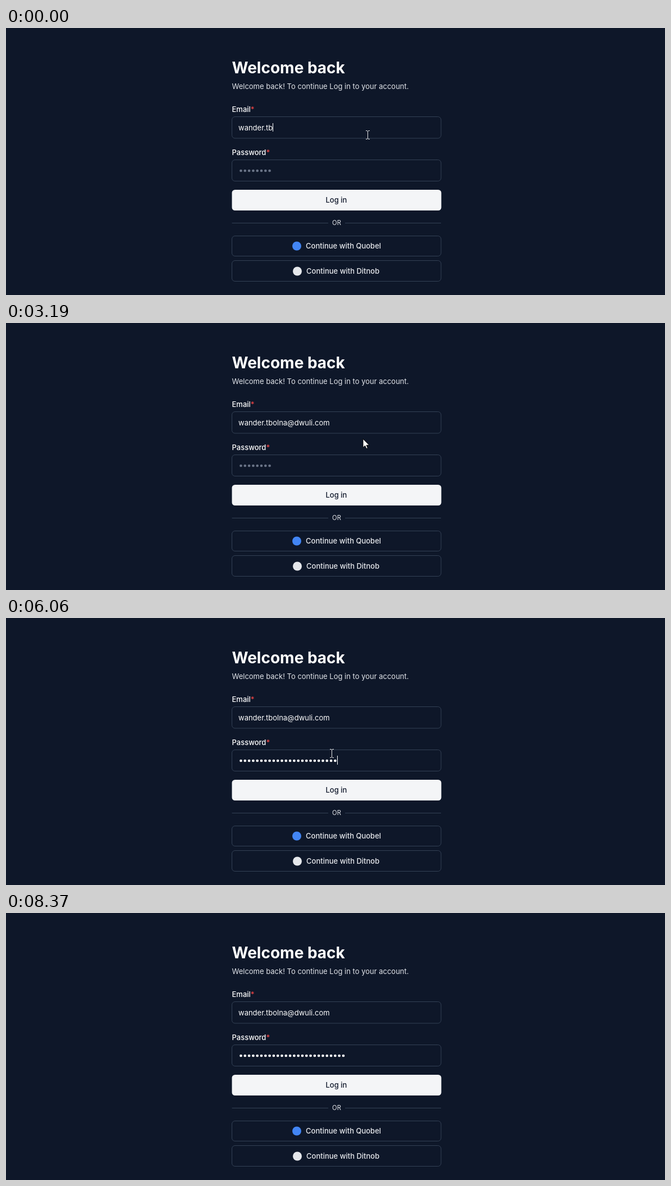
Animation, 1174 px wide and 477 px high, one loop 8740 ms. Source, as an HTML page:

```html
<!DOCTYPE html>
<html lang="en">
<head>
<meta charset="utf-8">
<title>Log in</title>
<style>
  html, body { margin: 0; width: 100%; height: 100%; overflow: hidden; background: #0e1729; }
  svg { display: block; }
  text { font: 400 13px Inter, sans-serif; fill: #fff; }
  .title { font-size: 28px; font-weight: 700; }
  .soft { fill: #e2e5ea; }
  .label { font-weight: 500; }
  .star { fill: #ef4444; }
  .social text { font-weight: 500; fill: #e9ebef; }
  .or { font-size: 11.2px; text-anchor: middle; }
  .box { fill: none; stroke: #334155; }
  .dots { stroke-width: 4.7; stroke-linecap: round; stroke-dasharray: 0 7.3; }
  .loading .dim { opacity: .5; }
  .loading #login { opacity: .45; }
  #login text { fill: #0f172a; font-weight: 500; }
  #spinner { fill: none; stroke: #0f172a; stroke-width: 2; stroke-linecap: round; }
  .pointer { fill: #fff; stroke: #000; stroke-linejoin: round; }
</style>
</head>
<body>
<svg id="stage" width="1174" height="477" viewBox="0 0 1174 477">
  <text class="title" x="402.5" y="81">Welcome back</text>
  <text class="soft" x="402.5" y="109">Welcome back! To continue Log in to your account.</text>

  <text class="label" x="402.5" y="150">Email<tspan class="star">*</tspan></text>
  <g class="dim">
    <rect class="box" x="402.5" y="158.5" width="372.5" height="38.5" rx="5.5"/>
    <text id="email" x="414" y="183"></text>
  </g>

  <text class="label" x="402.5" y="227">Password<tspan class="star">*</tspan></text>
  <g class="dim">
    <rect class="box" x="402.5" y="235.5" width="372.5" height="38" rx="5.5"/>
    <path id="dots" class="dots"/>
  </g>
  <rect id="caret" width="1" fill="#fff"/>

  <g id="login">
    <rect id="face" x="402.5" y="289" width="373" height="37" rx="5.5"/>
    <path id="spinner" d="M6.6 0A6.6 6.6 0 1 1 2.05 -6.28"/>
    <text id="action" y="312">Log in</text>
  </g>

  <path class="box" d="M402.5 348.5H574M604 348.5H775"/>
  <text class="or soft" x="589" y="352">OR</text>

  <g class="social dim">
    <rect class="box" x="402.5" y="371.5" width="372.5" height="36" rx="5.5"/>
    <circle cx="518" cy="389.5" r="8" fill="#4285f4"/>
    <text x="534" y="394">Continue with Quobel</text>
    <rect class="box" x="402.5" y="415.5" width="372.5" height="37" rx="5.5"/>
    <circle cx="519" cy="434.5" r="8" fill="#e5e7eb"/>
    <text x="535" y="439">Continue with Ditnob</text>
  </g>

  <g id="cursor">
    <path id="beam" fill="none" stroke="#e6e6e6" d="M-3 -7.5H-1L.5 -6.5 2 -7.5H4M.5 -6.5V6.5M-3 7.5H-1L.5 6.5 2 7.5H4"/>
    <path id="arrow" class="pointer" d="M0 0V15.5L3.6 12.2 6 17.5 8.4 16.4 6.1 11.3H11Z"/>
    <path id="hand" class="pointer" d="M-1.5 1Q0 -1 1.5 1V7Q3 5.5 4.5 7.2 6 6 7.5 8 9.5 7 10.3 9V14Q10 17 8 20H0Q-1 17 -5 12.5 -5 10 -3 11L-1.5 12.5ZM1.5 7V10M4.5 7.2V10.5M7.5 8V11"/>
  </g>
</svg>
<script>
const LOOP = 8740, FOCUS_PASSWORD = 3560, LOAD_START = 7900, LOAD_END = 8340;
const BLINK = 520, DOT_STEP = 7.3;
const ADDRESS = "wander.tbolna@dwuli.com";

// Key points: time, then the values reached at that time.
const emailKeys = [[0, 9], [340, 10], [760, 13], [1410, 15], [1680, 18], [2310, 23]];
const passwordKeys = [[0, 0], [4440, 1], [4890, 5], [6120, 26]];
const cursorKeys = [
  [3060, 644, 191], [3190, 636, 207], [3650, 580, 242], [7630, 580, 242],
  [7750, 613, 299], [8010, 620, 309], [8160, 622, 310], [8370, 930, 480]
];

const $ = id => document.getElementById(id);
const set = (id, attrs) => { for (const k in attrs) $(id).setAttribute(k, attrs[k]); };
const show = (id, on) => { $(id).style.display = on ? "" : "none"; };

function valuesAt(keys, t) {
  const next = keys.findIndex(key => key[0] > t);
  if (next <= 0) return keys.at(next).slice(1);
  const [t0, ...from] = keys[next - 1], [t1, ...to] = keys[next];
  return from.map((v, i) => v + (to[i] - v) * (t - t0) / (t1 - t0));
}

// Solid while typing, blinking from the last key or focus on.
function caretVisible(t) {
  const lastKey = keys => keys.at(-1)[0];
  const rest = t < FOCUS_PASSWORD ? lastKey(emailKeys)
    : t < passwordKeys[1][0] ? FOCUS_PASSWORD : lastKey(passwordKeys);
  return t < LOAD_START && (t < rest || (t - rest) % (2 * BLINK) < BLINK);
}

function draw(t) {
  const loading = t >= LOAD_START && t < LOAD_END;
  $("stage").classList.toggle("loading", loading);

  $("email").textContent = ADDRESS.slice(0, Math.floor(valuesAt(emailKeys, t)[0]));
  const count = Math.floor(valuesAt(passwordKeys, t)[0]);
  set("dots", {
    d: `M418.5 255h${DOT_STEP * ((count || 8) - 1) + .1}`,
    stroke: count ? "#fff" : "#697386"
  });

  show("caret", caretVisible(t));
  set("caret", t < FOCUS_PASSWORD
    ? { x: Math.floor(414 + $("email").getComputedTextLength()), y: 170, height: 15 }
    : { x: Math.floor(415 + DOT_STEP * count), y: 246, height: 16 });

  const [x, y] = valuesAt(cursorKeys, t);
  const over = (top, bottom) => x > 402 && x < 775 && y >= top && y < bottom;
  const beam = over(158, 198) || over(235, 274);
  const hand = over(289, 326) && !loading;
  show("beam", beam);
  show("hand", hand);
  show("arrow", !beam && !hand);
  set("cursor", { transform: `translate(${Math.round(x)} ${Math.round(y)})` });

  set("face", { fill: hand ? "#f2f2f5" : "#f4f5f7" });
  set("action", { x: loading ? 580.7 : 569.5 });
  show("spinner", loading);
  set("spinner", { transform: `translate(566.5 307.7) rotate(${(t - LOAD_START) * .36})` });
}

const start = performance.now();
function tick() {
  draw((performance.now() - start) % LOOP);
  requestAnimationFrame(tick);
}
tick();
</script>
</body>
</html>
```
